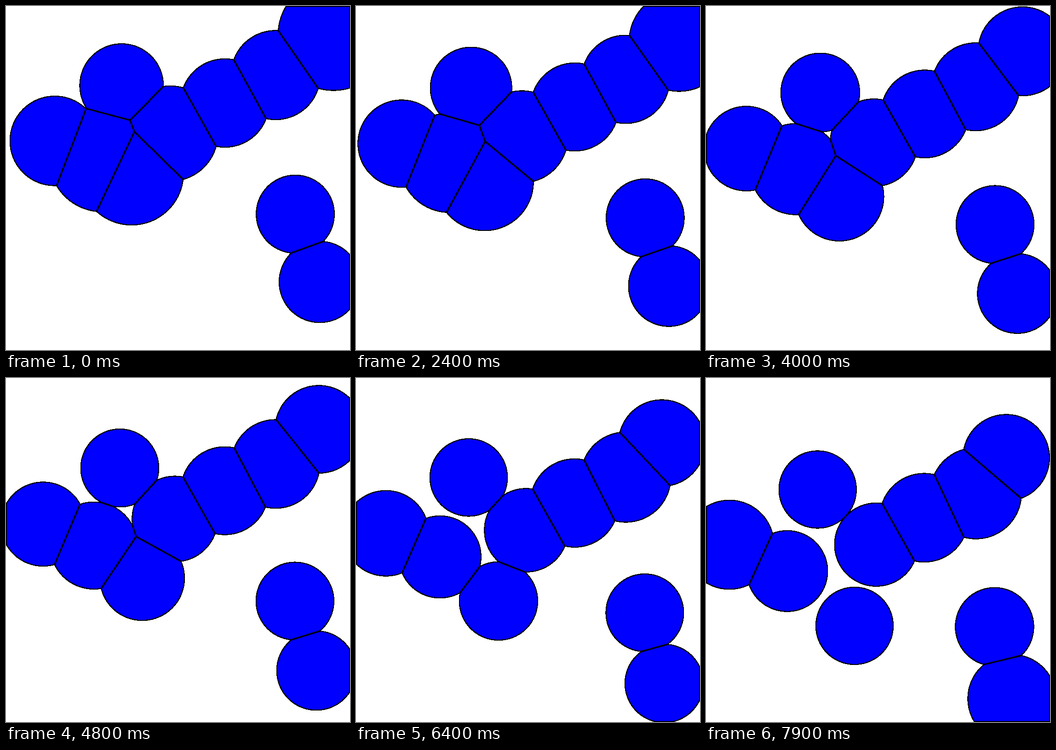
A matplotlib script for the animation above (8000 ms loop, 748 by 748 pixels).

```python
import numpy as np
import matplotlib.pyplot as plt
from matplotlib.animation import FuncAnimation
from matplotlib.collections import LineCollection, PolyCollection

SIZE, DPI, FRAMES, STEP = 748, 100, 80, 100
PX = 72 / DPI
AREA = np.pi * 84 ** 2       # every cell keeps this area
GRAVITY = np.array([0, 2.98])
SPRING = 0.124               # pull of each particle to its cell's centroid

START = np.array([
    (106, 293.3), (251.3, 173), (208.9, 332.8), (273.1, 363.3), (357.2, 277.4),
    (475.7, 211), (586.3, 150.2), (712, 63.2), (629, 452.6), (682.3, 600),
])

angle = np.linspace(0, 2 * np.pi, 720, endpoint=False)
CIRCLE = np.column_stack([np.cos(angle), np.sin(angle)])


def cut(poly, normal, limit):
    """Keep the part of a convex polygon where p . normal <= limit."""
    s = poly @ normal - limit
    inside = s <= 0
    if inside.all() or not inside.any():
        return poly
    first = np.flatnonzero(inside & ~np.roll(inside, 1))[0]
    poly, s = np.roll(poly, -first, axis=0), np.roll(s, -first)
    n = inside.sum()

    def cross(a, b):
        return poly[a] + (poly[b] - poly[a]) * s[a] / (s[a] - s[b])

    return np.vstack([cross(-1, 0), poly[:n], cross(n - 1, n)])


def cells(pts, w):
    """Power diagram of discs with squared radii w, kept inside the stage."""
    r = np.sqrt(w)
    out = []
    for i, p in enumerate(pts):
        poly = np.clip(p + r[i] * CIRCLE, 0.5, SIZE - 0.5)
        for j, q in enumerate(pts):
            if j != i and np.hypot(*(q - p)) < r[i] + r[j]:
                poly = cut(poly, 2 * (q - p), q @ q - w[j] - p @ p + w[i])
        out.append(poly)
    return out


def measure(poly):
    """Area and centroid of a polygon."""
    a = poly - poly[0]
    b = np.roll(a, -1, axis=0)
    z = a[:, 0] * b[:, 1] - a[:, 1] * b[:, 0]
    return z.sum() / 2, poly[0] + z @ (a + b) / (3 * z.sum())


def fit(pts, w, rounds):
    """Adjust the radii until every cell covers the same area."""
    for _ in range(rounds):
        w = w + 0.3 * (AREA - np.array([measure(c)[0] for c in cells(pts, w)]))
    return w, cells(pts, w)


def simulate():
    """Incompressible drops, released from rest and falling under gravity."""
    dt = STEP / 1000
    pos, vel = START, np.zeros_like(START)
    w, shape = fit(pos, np.full(len(pos), 95.0 ** 2), 70)
    shapes = [shape]
    for k in range(FRAMES - 1):
        centroid = np.array([measure(c)[1] for c in shape])
        acc = GRAVITY + SPRING * (centroid - pos)
        vel = vel + acc * (dt if k else dt / 2)
        pos = pos + vel * dt
        w, shape = fit(pos, w, 12)
        shapes.append(shape)
    return shapes


def walls(poly):
    """Straight edges shared by two cells."""
    nxt = np.roll(poly, -1, axis=0)
    long = np.hypot(*(nxt - poly).T) > 3
    return list(np.stack([poly, nxt], axis=1)[long])


shapes = simulate()

fig = plt.figure(figsize=(SIZE / DPI, SIZE / DPI), dpi=DPI, facecolor="white")
ax = fig.add_axes([0, 0, 1, 1])
ax.set(xlim=(0, SIZE), ylim=(SIZE, 0))
ax.axis("off")

blobs = PolyCollection([], facecolors="#0000ff", edgecolors="black",
                       linewidths=1.15 * PX, antialiaseds=False)
edges = LineCollection([], colors="black", linewidths=2.1 * PX,
                       antialiaseds=False)
ax.add_collection(blobs)
ax.add_collection(edges)


def draw(k):
    blobs.set_verts(shapes[k])
    edges.set_segments([e for c in shapes[k] for e in walls(c)])
    return blobs, edges


anim = FuncAnimation(fig, draw, frames=FRAMES, interval=STEP,
                     repeat=True, repeat_delay=0)
plt.show()
```
